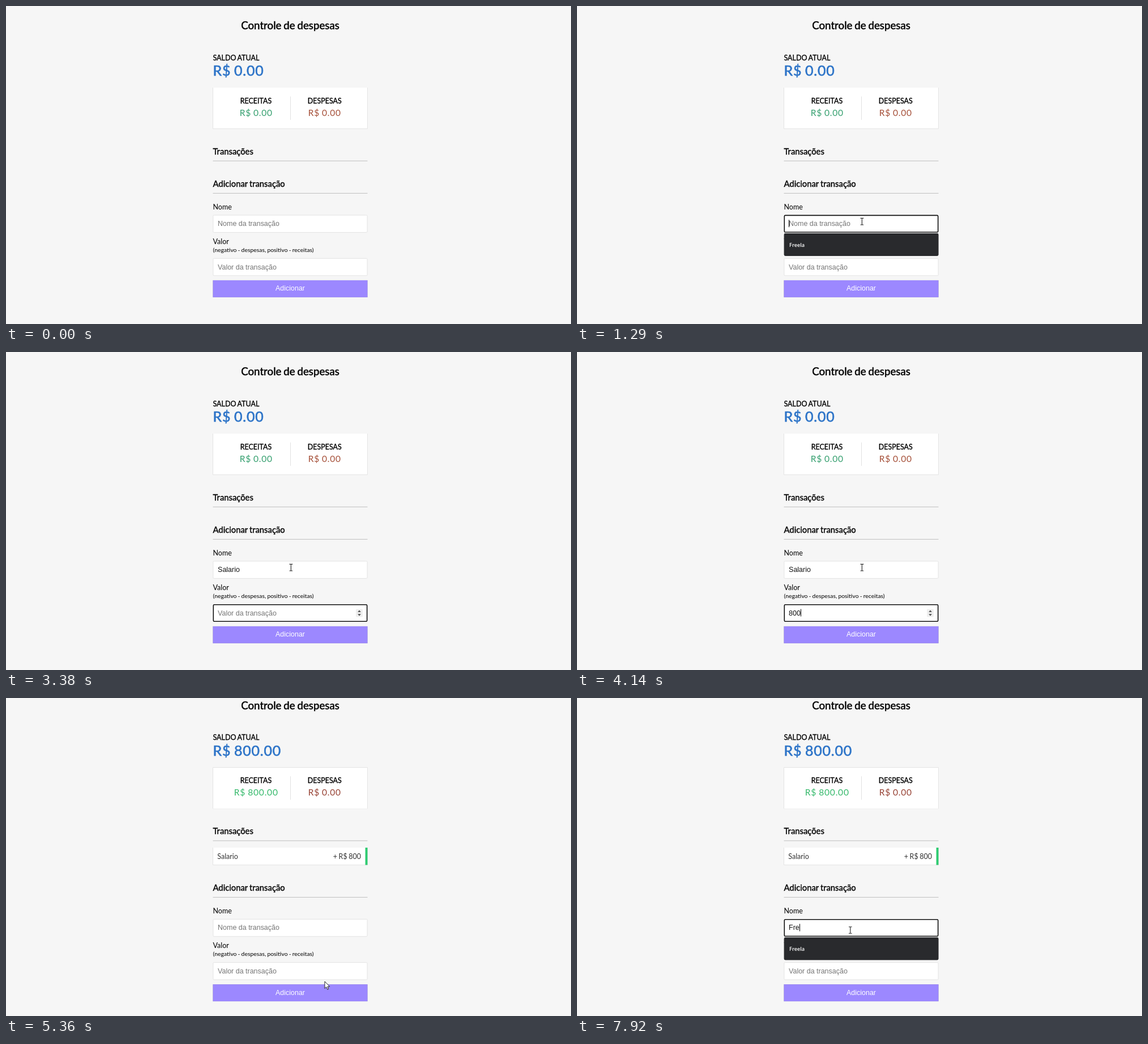
Animation of 998 by 561 pixels, one loop 8000 ms. Source, as an HTML page:

```html
<!DOCTYPE html>
<html lang="pt-BR">
<head>
<meta charset="utf-8">
<title>Controle de despesas</title>
<style>
  html, body { margin: 0; width: 100%; height: 100%; overflow: hidden; background: #f6f6f6; }
  svg { display: block; width: 998px; height: 561px; font-family: Lato, sans-serif; font-size: 12.48px; }
  text { white-space: pre; word-spacing: -.05em; }
  .bold { stroke: currentColor; stroke-width: .026em; }
  .title { font-size: 18.72px; }
  .head { font-size: 14.8px; }
  .total { font-size: 24.96px; letter-spacing: .78px; color: #2d74c8; fill: #2d74c8; }
  .money { font-size: 15.6px; letter-spacing: .78px; }
  .mid { text-anchor: middle; }
  .end { text-anchor: end; }
  .hint { font-size: 10.4px; }
  .ui { font-family: "Liberation Sans", Arial, sans-serif; fill: #111; word-spacing: 0; }
  .ui.empty { fill: #757575; }
  .item { fill: #333; }
  .rule { fill: #b8b8b8; }
  .box { fill: #fff; stroke: #dedede; stroke-width: .8; }
  .shadow { filter: drop-shadow(0 .9px .75px rgba(0,0,0,.36)); }
  .menu { font: 600 9.2px "Open Sans", "Noto Sans", sans-serif; }
</style>
</head>
<body>
<svg viewBox="0 0 998 561">
  <rect width="998" height="561" fill="#f6f6f6"/>

  <g id="top">
    <text class="title bold mid" x="502" y="40.95">Controle de despesas</text>
    <text class="bold" x="365.5" y="95.7">SALDO ATUAL</text>
    <text class="total bold" id="total" x="365.5" y="123.2"></text>
    <rect class="shadow" x="365.5" y="144" width="273" height="72.5" fill="#fff"/>
    <rect x="502" y="159.6" width=".9" height="41.3" fill="#dedede"/>
    <text class="bold mid" x="441.5" y="171.8">RECEITAS</text>
    <text class="money mid" id="income" x="441.8" y="193.9"></text>
    <text class="bold mid" x="562.8" y="171.8">DESPESAS</text>
    <text class="money mid" id="expense" x="562.8" y="193.9">R$ 0.00</text>
    <text class="head bold" x="365.5" y="261.8">Transações</text>
    <rect class="rule" x="365.5" y="272.8" width="273" height=".9"/>
  </g>

  <g id="entry">
    <g class="shadow">
      <rect x="365.5" y="264" width="273" height="30.5" fill="#fff"/>
      <rect x="634.6" y="264" width="3.9" height="30.5" fill="#2ecc71"/>
    </g>
    <text class="item" x="373.3" y="284.3">Salario</text>
    <text class="item end" x="626.9" y="284.3">+ R$ 800</text>
  </g>

  <g id="form">
    <text class="head bold" x="365.5" y="318.8">Adicionar transação</text>
    <rect class="rule" x="365.5" y="329.9" width="273" height=".9"/>
    <text x="365.5" y="358.6">Nome</text>
    <rect class="box" x="365.9" y="369" width="272.2" height="30.4" rx="1.6"/>
    <text class="ui" id="name" x="374.1" y="388.2"></text>
    <text x="365.5" y="419.9">Valor</text>
    <text class="hint" x="365.5" y="434.2">(negativo - despesas, positivo - receitas)</text>
    <rect class="box" x="365.9" y="445.3" width="272.2" height="30.4" rx="1.6"/>
    <text class="ui" id="value" x="374.1" y="464.5"></text>
    <g id="spin">
      <rect x="618" y="453.4" width="12" height="14" rx="1" fill="#efefef"/>
      <path d="M621.2 458.8l2.9-3.2 2.9 3.2zM621.2 462.2l2.9 3.2 2.9-3.2z" fill="#484848"/>
    </g>
    <g id="ring" fill="none">
      <rect x="365.1" y="368.2" width="273.8" height="32" rx="2.6" stroke="#fff" stroke-width=".8"/>
      <rect x="366.3" y="369.4" width="271.4" height="29.6" rx="1.6" stroke="#101010" stroke-width="1.6"/>
    </g>
    <rect class="shadow" x="365.5" y="483.9" width="273" height="29.9" fill="#9c88ff"/>
    <text class="ui mid" x="502" y="502.4" style="fill:#fff">Adicionar</text>
    <rect id="caret" width="1" height="13" fill="#000"/>
    <g id="menu">
      <rect class="shadow" x="365.7" y="401" width="272.8" height="40" rx="2.4" fill="#292a2d"/>
      <text class="menu" x="375" y="424.9" fill="#fff">Freela</text>
    </g>
  </g>

  <g id="cursor">
    <circle id="glow" r="9.3" fill="#fae62c" opacity=".75"/>
    <path id="arrow" d="M0 0V12.4L2.8 9.8 4.8 14.2 6.8 13.3 4.9 9.1H8.8Z" fill="#fff" stroke="#111" stroke-width=".9"/>
    <path id="beam" d="M-2.8-5.8H-.8L0-5.2.8-5.8H2.8M0-5.2V5.2M-2.8 5.8H-.8L0 5.2.8 5.8H2.8" fill="none" stroke="#222" stroke-width="1.1"/>
  </g>
</svg>

<script>
const LOOP = 8000;
const FIELD_GAP = 76.3;
const el = {};
document.querySelectorAll('[id]').forEach(n => el[n.id] = n);

// Each track is a list of [start in ms, ...state]; the state holds until the next start.
const typing = (word, times) => times.map((t, i) => [t, word.slice(0, i + 1)]);

const names = [[0, ''],
  ...typing('Salario', [1720, 1940, 2050, 2160, 2270, 2400, 2490]),
  [5250, ''],
  ...typing('Fre', [7580, 7800, 7920])];
const values = [[0, ''], ...typing('800', [3700, 3930, 4140]), [5250, '']];
const focus = [[0, ''], [1080, 'name'], [2830, 'value'], [5140, ''], [6260, 'name']];
const caret = [[0, true], [3380, false], [3700, true], [4690, false], [6260, true], [6940, false], [7490, true]];
const menu = [[0, false], [1180, true], [1720, false], [6380, true]];
const spin = [[0, false], [2830, true], [5140, false], [5590, true], [5700, false]];
const glow = [[0, false], [1080, true], [1290, false], [5140, true], [5360, false], [6260, true], [6480, false]];
const added = [[0, false], [5250, true]];
const pointer = [
  [0, '', 0, 0],
  [190, 'arrow', 820, 538], [300, 'arrow', 766, 523], [410, 'arrow', 731, 508],
  [520, 'arrow', 676, 477], [630, 'arrow', 610, 436], [740, 'arrow', 552, 402],
  [850, 'beam', 518, 379], [960, 'arrow', 503, 367], [1080, 'beam', 503.4, 380.2],
  [4800, 'beam', 511, 391], [4910, 'arrow', 527, 426], [5030, 'arrow', 552, 482],
  [5140, 'arrow', 563, 500],
  [5590, 'beam', 556, 482], [5700, 'arrow', 541, 447], [5810, 'beam', 522, 410],
  [5920, 'arrow', 504, 382], [6040, 'arrow', 492, 386], [6260, 'beam', 482.8, 409.5]
];

const at = (track, t) => track.findLast(s => s[0] <= t).slice(1);
const show = (node, on) => node.setAttribute('visibility', on ? 'visible' : 'hidden');
const move = (node, x, y) => node.setAttribute('transform', `translate(${x} ${y})`);

function field(key, text, hint) {
  el[key].textContent = text || hint;
  el[key].classList.toggle('empty', !text);
}

function draw(t) {
  const [name] = at(names, t), [value] = at(values, t), [active] = at(focus, t);
  const [done] = at(added, t), [kind, x, y] = at(pointer, t);

  move(el.top, 0, done ? -21.4 : 0);
  move(el.form, 0, done ? 21.3 : 0);
  show(el.entry, done);
  el.total.textContent = el.income.textContent = done ? 'R$ 800.00' : 'R$ 0.00';
  el.income.setAttribute('fill', done ? '#35b96b' : '#349f6e');
  el.expense.setAttribute('fill', done ? '#974234' : '#a54f38');

  field('name', name, 'Nome da transação');
  field('value', value, 'Valor da transação');
  show(el.menu, at(menu, t)[0]);
  show(el.spin, at(spin, t)[0]);

  show(el.ring, active);
  show(el.caret, active && at(caret, t)[0]);
  if (active) {
    const typed = active === 'name' ? name : value;
    const width = typed ? el[active].getComputedTextLength() : 0;
    const drop = active === 'name' ? 0 : FIELD_GAP;
    move(el.ring, 0, drop);
    move(el.caret, Math.round(374.1 + width), 377.2 + drop);
  }

  move(el.cursor, x, y);
  show(el.arrow, kind === 'arrow');
  show(el.beam, kind === 'beam');
  show(el.glow, at(glow, t)[0]);
}

const start = performance.now();
function tick() {
  draw((performance.now() - start) % LOOP);
  requestAnimationFrame(tick);
}
tick();
</script>
</body>
</html>
```
